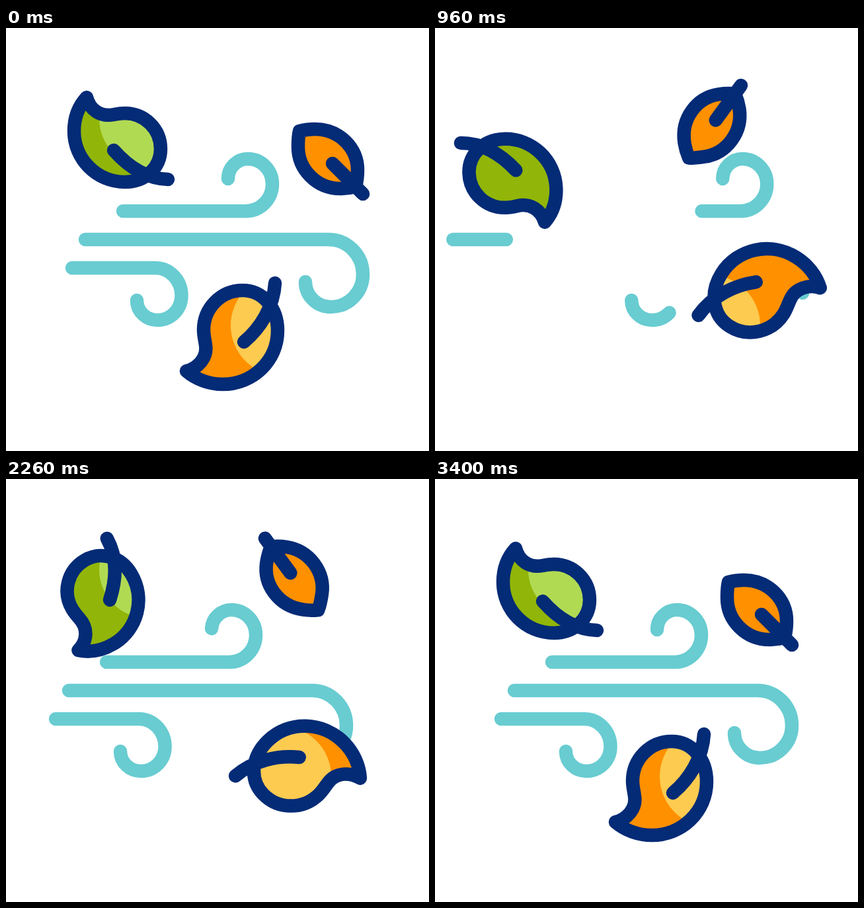
An HTML page for the animation above (3600 ms loop, 640 by 640 pixels).

```html
<!DOCTYPE html>
<html lang="en">
<head>
<meta charset="utf-8">
<title>Leaves in the wind</title>
<style>
  html, body { margin: 0; width: 100%; height: 100%; overflow: hidden; background: #fff; }
  svg { display: block; width: 100vw; height: 100vh; }
  .wind path, .line { fill: none; stroke-width: 20.5; stroke-linecap: round; stroke-linejoin: round; }
  .wind path { stroke: #68ccd1; }
  .line { stroke: #042b76; }
</style>
</head>
<body>
<svg viewBox="0 0 640 640">
  <defs></defs>
  <g class="wind" id="leaving"></g>
  <g class="wind" id="arriving"></g>
  <g id="leaves"></g>
</svg>
<script>
const LOOP = 3600;
const TRIM = 1080;

const gusts = [
  { d: 'M177 277H363a40 41 0 0 0 40-41a37 38 0 0 0-37-38a30 30 0 0 0-30 30', out: 520, in: 1230 },
  { d: 'M120 320H488a52 53 0 0 1 52 53a49 49 0 0 1-49 49a38 38 0 0 1-38-38', out: 0, in: 700 },
  { d: 'M100 363H226a39.5 42 0 0 1 39.5 42a36 37 0 0 1-36 37a31 30 0 0 1-31.500-30', out: 250, in: 960 }
];

// Rows: time, horizontal shift
const leavingShift = [[0, 0], [300, 6], [540, 27], [660, 48.5], [750, 65], [1000, 104], [1300, 129], [1600, 138]];
const arrivingShift = [[700, -106], [1100, -83], [1300, -72], [1840, -45], [2260, -25], [2840, -2], [3200, 0]];

// Rows: time, angle, x shift, y shift
const leaves = [
  {
    body: 'M122 105C127 124 143 135 163 131C168 130 174 129 180 129C210 129 234 153 234 183C234 211 211 233 180 233C137 233 103 198 103 156C103 136 110 118 122 105Z',
    stem: 'M163 185C186 211 214 228 245 229',
    fill: '#91b508', shade: '#b1da53', disc: [215, 137, 74], pivot: [147, 161],
    steps: [[0, 0, 0, 0], [300, -48, -3, 22], [660, -155, -11, 77], [1300, -195, -4, 78],
      [1840, -168.5, -4.6, 62], [2260, -121, -2.3, 48], [2720, -36, -5, 12], [2840, -9.5, -5, 5], [3080, 0, 0, 0]]
  },
  {
    body: 'M444 156C452 154 460 153 467 153C505 153 532 182 532 215C532 224 531 232 529 240C521 242 514 243 506 243C470 243 442 214 442 180C442 172 442 164 444 156Z',
    stem: 'M494 205L540 251',
    fill: '#ff9000', pivot: [491.5, 203.5],
    steps: [[0, 0, 0, 0], [300, -3, -3, -4], [660, -30.5, -23, -31.5], [1080, -125, -82, -70],
      [1300, -155, -93, -78], [1640, -181, -97, -80], [1840, -183.6, -89.5, -75.5],
      [2260, -171.3, -59, -59.5], [2840, -99.5, -15.5, -22.5], [3260, -6, -1, -1], [3400, 0, 0, 0]]
  },
  {
    body: 'M273 519C290 515 305 499 302 480C301 472 299 465 299 457C299 424 325 397 358 397C389 397 411 424 411 458C411 503 374 539 328 539C308 539 288 532 273 519Z',
    stem: 'M360 475C385 454 405 422 407 386',
    fill: '#ff9000', shade: '#fdcb50', disc: [416, 450, 76], pivot: [370, 472.5],
    steps: [[0, 0, 0, 0], [120, 0, 0, 0], [320, -14, 14, -2], [540, -55, 62, -20], [660, -84.6, 98, -51],
      [900, -140, 106, -88], [1300, -175.9, 103, -102], [1840, -169.6, 93, -89],
      [2260, -134.3, 65, -57], [2840, -43.7, 23, -21], [3220, 0, 0, 0]]
  }
];

const $ = sel => document.querySelector(sel);

function add(parent, tag, attrs = {}) {
  const el = document.createElementNS('http://www.w3.org/2000/svg', tag);
  for (const k in attrs) el.setAttribute(k, attrs[k]);
  return parent.appendChild(el);
}

// Smooth monotone curve through column c of the rows, flat at both ends
function sample(rows, t, c) {
  const last = rows.length - 1;
  if (t <= rows[0][0]) return rows[0][c];
  if (t >= rows[last][0]) return rows[last][c];
  const slope = i => (rows[i + 1][c] - rows[i][c]) / (rows[i + 1][0] - rows[i][0]);
  const tangent = i => {
    if (i === 0 || i === last) return 0;
    const a = slope(i - 1), b = slope(i);
    return a * b > 0 ? 2 * a * b / (a + b) : 0;
  };
  const i = rows.findIndex(r => r[0] > t) - 1;
  const h = rows[i + 1][0] - rows[i][0];
  const u = (t - rows[i][0]) / h, v = 1 - u;
  return rows[i][c] * v * v * (1 + 2 * u) + rows[i + 1][c] * u * u * (1 + 2 * v)
    + h * u * v * (tangent(i) * v - tangent(i + 1) * u);
}

const ease = u => (1 - Math.cos(Math.PI * Math.min(1, Math.max(0, u)))) / 2;

function trim(el, from, to) {
  const len = to - from;
  el.style.display = len > 0.0002 ? '' : 'none';
  el.setAttribute('stroke-dasharray', `${len} 2`);
  el.setAttribute('stroke-dashoffset', -from);
}

for (const g of gusts) {
  g.old = add($('#leaving'), 'path', { d: g.d, pathLength: 1 });
  g.fresh = add($('#arriving'), 'path', { d: g.d, pathLength: 1 });
}

leaves.forEach((leaf, i) => {
  const root = add($('#leaves'), 'g');
  leaf.moving = [add(root, 'path', { d: leaf.body, fill: leaf.fill })];
  if (leaf.shade) {
    // The lit disc stays put while the leaf turns over it
    const clip = add($('defs'), 'clipPath', { id: 'clip' + i });
    leaf.moving.push(add(clip, 'path', { d: leaf.body }));
    const [cx, cy, r] = leaf.disc;
    const lit = add(root, 'g', { 'clip-path': `url(#clip${i})` });
    add(lit, 'circle', { cx, cy, r, fill: leaf.shade });
  }
  leaf.moving.push(add(root, 'path', { d: leaf.body + leaf.stem, class: 'line' }));
});

function draw(t) {
  $('#leaving').setAttribute('transform', `translate(${sample(leavingShift, t, 1)} 0)`);
  $('#arriving').setAttribute('transform', `translate(${sample(arrivingShift, t, 1)} 0)`);
  for (const g of gusts) {
    trim(g.old, ease((t - g.out) / TRIM), 1);
    trim(g.fresh, 0, ease((t - g.in) / TRIM));
  }
  for (const { steps, pivot, moving } of leaves) {
    const [angle, x, y] = [1, 2, 3].map(c => sample(steps, t, c));
    const move = `translate(${x} ${y}) rotate(${angle} ${pivot})`;
    for (const el of moving) el.setAttribute('transform', move);
  }
}

const start = performance.now();
function tick() {
  draw((performance.now() - start) % LOOP);
  requestAnimationFrame(tick);
}
tick();
</script>
</body>
</html>
```
